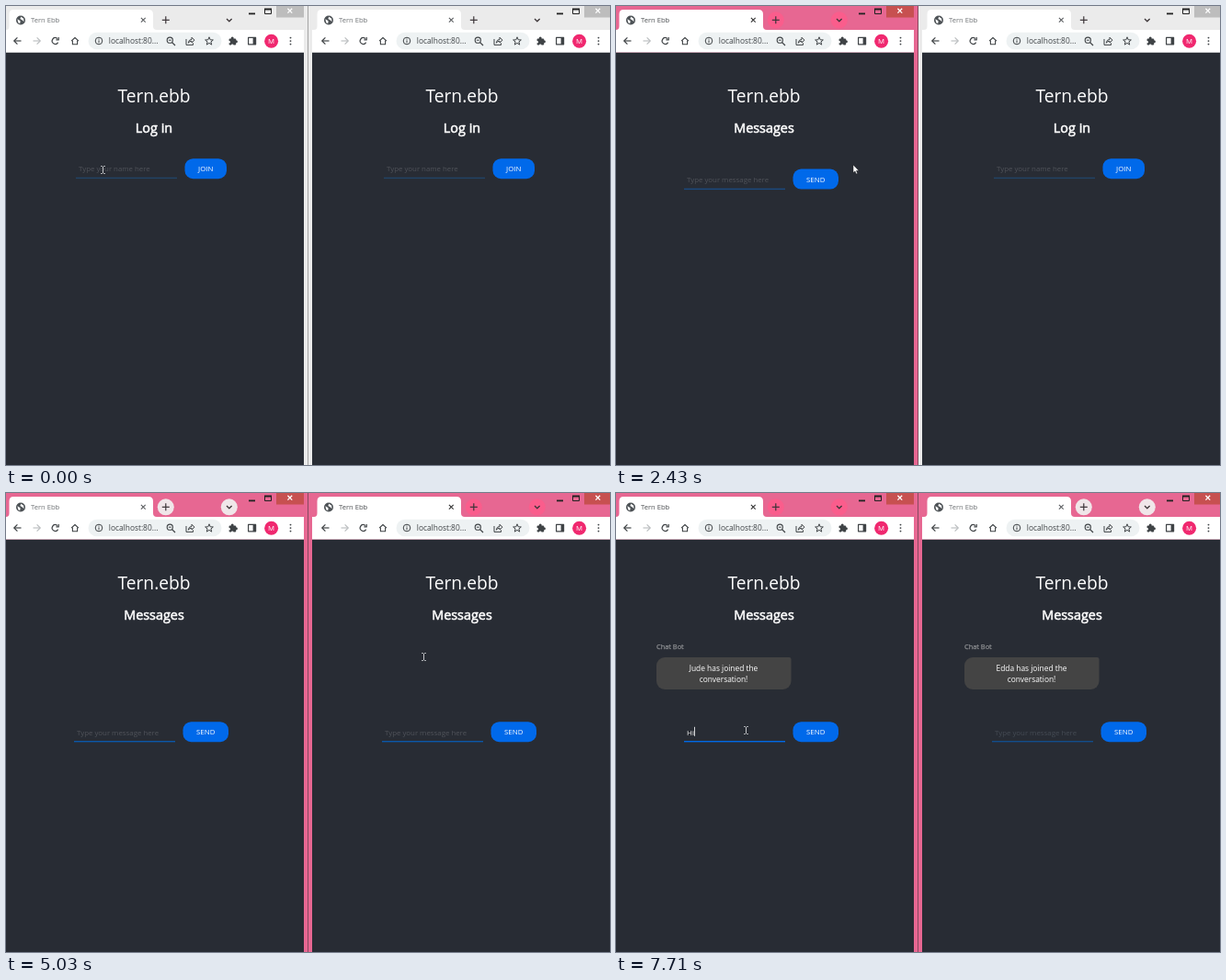
Recreate the animation shown at these times as an HTML page with a canvas. Size 657 by 500 pixels, loop 8 s.

```html
<!DOCTYPE html>
<html lang="en">
<head>
<meta charset="utf-8">
<title>Two chat windows</title>
<style>
  html, body { margin: 0; width: 100%; height: 100%; overflow: hidden; background: #282c34; }
  canvas { display: block; width: 657px; height: 500px; }
</style>
</head>
<body>
<canvas id="stage" width="657" height="500"></canvas>
<script>
const ctx = document.getElementById('stage').getContext('2d');
const LOOP = 8000;
const SHIFT = 335;
const SANS = '"Open Sans", "Noto Sans", sans-serif';
const BG = '#282c34', BLUE = '#0069ea', PINK = '#e76792', INK = '#3f4346';

// pointer: time, x, y
const PATH = [
  [0, 105, 178], [40, 105, 178], [420, 106, 174], [1650, 106, 174],
  [1840, 216, 171], [2310, 216, 171], [2430, 258, 173], [2790, 454, 178],
  [6130, 454, 178], [6860, 141, 258], [LOOP, 141, 258]
];

const clamp = v => Math.max(0, Math.min(1, v));
const smooth = v => v * v * (3 - 2 * v);
const ramp = (t, a, b) => smooth(clamp((t - a) / (b - a)));
const within = (t, a, b) => t >= a && t < b;

function mix(a, b, k) {
  const part = (s, i) => parseInt(s.substr(1 + i * 2, 2), 16);
  const c = [0, 1, 2].map(i => Math.round(part(a, i) + (part(b, i) - part(a, i)) * k));
  return `rgb(${c})`;
}

function text(s, x, y, size, color, align = 'left', bold = 0) {
  ctx.font = `400 ${size}px ${SANS}`;
  ctx.textAlign = align;
  ctx.fillStyle = color;
  ctx.fillText(s, x, y);
  if (bold) {
    ctx.strokeStyle = color;
    ctx.lineWidth = bold;
    ctx.strokeText(s, x, y);
  }
}

function rect(x, y, w, h, color) {
  ctx.fillStyle = color;
  ctx.fillRect(x, y, w, h);
}

function round(x, y, w, h, r, color) {
  ctx.fillStyle = color;
  ctx.beginPath();
  ctx.roundRect(x, y, w, h, r);
  ctx.fill();
}

function disc(x, y, r, color) {
  ctx.fillStyle = color;
  ctx.beginPath();
  ctx.arc(x, y, r, 0, 7);
  ctx.fill();
}

function ring(x, y, r, color, w = 1.1, a = 0, b = Math.PI * 2) {
  ctx.strokeStyle = color;
  ctx.lineWidth = w;
  ctx.beginPath();
  ctx.arc(x, y, r, a, b);
  ctx.stroke();
}

function line(color, w, ...pts) {
  ctx.strokeStyle = color;
  ctx.lineWidth = w;
  ctx.beginPath();
  for (let i = 0; i < pts.length; i += 2) ctx.lineTo(pts[i], pts[i + 1]);
  ctx.stroke();
}

function cross(x, y, r, color, w) {
  line(color, w, x - r, y - r, x + r, y + r);
  line(color, w, x + r, y - r, x - r, y + r);
}

function globe(x, y) {
  disc(x, y, 5, '#4d5256');
  ctx.fillStyle = '#fff';
  ctx.beginPath();
  ctx.moveTo(x - 3.6, y - 1.2);
  ctx.lineTo(x - .4, y + .8);
  ctx.lineTo(x - .8, y + 3.8);
  ctx.lineTo(x - 2.8, y + 2.4);
  ctx.fill();
  ctx.beginPath();
  ctx.moveTo(x + .2, y - 3.8);
  ctx.lineTo(x + 3, y - 2);
  ctx.lineTo(x + 3.6, y + 1.4);
  ctx.lineTo(x + 1.8, y);
  ctx.lineTo(x - .6, y - 1.6);
  ctx.fill();
}

function titleBar(bar, circle, dim, close) {
  rect(-6, 0, 334, 26, bar);
  ctx.fillStyle = '#fff';
  ctx.beginPath();
  ctx.moveTo(0, 26);
  ctx.quadraticCurveTo(3.5, 26, 3.5, 22);
  ctx.lineTo(3.5, 9);
  ctx.quadraticCurveTo(3.5, 4, 8, 4);
  ctx.lineTo(155, 4);
  ctx.quadraticCurveTo(160, 4, 160, 9);
  ctx.lineTo(160, 22);
  ctx.quadraticCurveTo(160, 26, 164, 26);
  ctx.fill();
  globe(16, 15.5);
  text('Tern Ebb', 27, 18.3, 7.6, dim ? '#6c7073' : '#4a4d50');
  cross(149.3, 15.2, 2.4, dim ? '#5b5e61' : '#333', 1.1);
  if (circle) [173.8, 242.8].forEach(x => disc(x, 15.3, 9, circle));
  line('#3b3437', 1.2, 169.8, 15.3, 177.8, 15.3);
  line('#3b3437', 1.2, 173.8, 11.3, 173.8, 19.3);
  line('#3b3437', 1.3, 240, 14, 242.8, 16.8, 245.6, 14);
  rect(264, 7.5, 7, 1.8, '#222');
  ctx.strokeStyle = '#222';
  ctx.lineWidth = 1;
  ctx.strokeRect(281.5, 3.5, 7, 5);
  rect(281, 2.5, 8, 2, '#222');
  rect(294, 0, 30, 12.5, close);
  cross(308.8, 5.2, 2.4, '#fff', 1.3);
}

function toolBar() {
  rect(-2, 26, 326, 24.5, '#fff');
  line(INK, 1.2, 16.5, 38, 8.8, 38);
  line(INK, 1.2, 12.4, 34.4, 8.8, 38, 12.4, 41.6);
  line('#bcbfc1', 1.2, 29.5, 38, 37.2, 38);
  line('#bcbfc1', 1.2, 33.6, 34.4, 37.2, 38, 33.6, 41.6);
  ring(53.6, 38, 3.4, INK, 1.2, .5, 5.5);
  line(INK, 1.2, 57.2, 34, 57.2, 36.9, 54.4, 36.9);
  line(INK, 1.1, 71, 38.2, 75, 34.5, 79, 38.2);
  line(INK, 1.1, 72.4, 37.5, 72.4, 41.7, 77.6, 41.7, 77.6, 37.5);

  round(89.5, 28.8, 145, 18.4, 9.2, '#eef2f3');
  ring(101, 38, 3.8, INK, 1);
  rect(100.5, 37.4, 1, 2.8, INK);
  rect(100.5, 35.6, 1, 1, INK);
  text('localhost:80...', 111.8, 41, 8.4, '#404447');
  ring(178.3, 37.2, 3.1, INK, 1.1);
  line(INK, 1.3, 180.6, 39.6, 184, 43);
  line(INK, 1, 176.8, 37.2, 179.8, 37.2);
  line(INK, 1, 196, 36, 196, 42.4, 203.5, 42.4, 203.5, 40.4);
  ctx.beginPath();
  ctx.moveTo(198.2, 40.2);
  ctx.quadraticCurveTo(198.8, 36.4, 202, 36.4);
  ctx.lineTo(202, 34.2);
  ctx.lineTo(205, 37.2);
  ctx.lineTo(202, 40);
  ctx.lineTo(202, 38.3);
  ctx.quadraticCurveTo(199.8, 38.2, 198.2, 40.2);
  ctx.stroke();
  ctx.beginPath();
  for (let i = 0; i < 10; i++) {
    const r = i % 2 ? 2 : 4.6, a = i * Math.PI / 5 - Math.PI / 2;
    ctx.lineTo(221 + r * Math.cos(a), 38.4 + r * Math.sin(a));
  }
  ctx.closePath();
  ctx.stroke();

  round(242.6, 35.4, 7.6, 7.2, 1, INK);
  disc(246.2, 35, 1.5, INK);
  disc(250.4, 38.8, 1.5, INK);
  disc(242.8, 39.2, 1.2, '#fff');
  disc(246.2, 42.6, 1.2, '#fff');
  ctx.strokeStyle = INK;
  ctx.lineWidth = 1.2;
  ctx.strokeRect(263.6, 34.4, 8, 7.4);
  rect(268.6, 34, 3.4, 8, INK);
  disc(288.6, 38.3, 7.5, '#f0286f');
  text('M', 288.6, 41.1, 7.8, '#fff', 'center');
  [34.6, 38.1, 41.6].forEach(y => disc(309.5, y, .95, INK));
}

function button(label, x, y, w, color = BLUE) {
  round(x, y, w, 22, 9, color);
  text(label, x + w / 2, y + 14, 7.9, '#fff', 'center');
}

// x: left edge, y: underline
function field(x, y, hint, f) {
  rect(x, y - .8, 110, 1.4, f.rule);
  const tx = x + 3, base = y - 7.3;
  if (f.value) text(f.value, tx, base, 8, '#f2f2f2');
  else text(hint, tx, base, 7.85, f.hint);
  if (f.caret) {
    ctx.font = `400 8px ${SANS}`;
    const cx = Math.round(tx + ctx.measureText(f.value).width);
    rect(cx, y - 16, 1, 10, '#d4d6d8');
  }
}

function botNote(who, alpha) {
  ctx.globalAlpha = alpha;
  text('Chat Bot', 44, 170, 7.4, '#8c8e91', 'left', .25);
  round(44, 179, 146.5, 35, [9, 2, 9, 9], '#444444');
  text(`${who} has joined the`, 117, 194, 8.4, '#fff', 'center');
  text('conversation!', 117, 206, 8.4, '#fff', 'center');
  ctx.globalAlpha = 1;
}

function drawWindow(dx, w) {
  ctx.save();
  ctx.translate(dx, 0);
  ctx.beginPath();
  ctx.rect(-6, 0, 334, 500);
  ctx.clip();
  rect(-6, 0, 334, 500, w.bar);
  titleBar(w.bar, w.circle, w.dim, w.close);
  rect(-2, 50.5, 326, 450, BG);
  toolBar();
  text('Tern.ebb', 161, 105, 19.2, '#fff', 'center');
  text(w.chat ? 'Messages' : 'Log in', 161, 138.3, 14.4, '#fff', 'center', .55);
  if (w.chat) {
    if (w.note > 0) botNote(w.who, w.note);
    field(74, w.low ? 270.8 : 199.5, 'Type your message here', w.field);
    button('SEND', 192.5, w.low ? 249.2 : 177.6, 49.5);
  } else {
    field(76, 187.5, 'Type your name here', w.field);
    button('JOIN', 194.5, 166.2, 45.5, w.hover ? '#0062dc' : BLUE);
  }
  ctx.restore();
}

function typed(t, keys) {
  return keys.filter(k => t >= k[0]).map(k => k[1]).join('');
}

function leftState(t) {
  const on = ramp(t, 20, 200), chat = t >= 2030, back = t >= 6940;
  const low = t >= 5030, focus = ramp(t, 6940, 7170);
  const active = within(t, 40, 3300) || back;
  const f = {};
  if (!chat) {
    f.value = typed(t, [[710, 'E'], [1020, 'd'], [1130, 'd'], [1470, 'a']]);
    f.hint = mix('#50535a', '#74777c', on);
    f.rule = mix('#214467', '#2c6394', ramp(t, 40, 420));
    f.caret = within(t, 120, 1380) || within(t, 1470, 1800);
  } else {
    f.value = typed(t, [[7460, 'H'], [7710, 'i']]);
    f.hint = mix('#50535a', '#74777c', focus);
    f.rule = low ? mix('#0b57a8', '#0069e6', focus) : '#1b4a80';
    f.caret = t >= 7000;
  }
  return {
    who: 'Jude', chat, low, field: f,
    note: ramp(t, 5030, 6200),
    hover: within(t, 1780, 2030),
    bar: mix('#ebebeb', PINK, t < 40 ? 0 : on),
    close: mix('#bdbdbd', '#c75050', t < 40 ? 0 : on),
    circle: t < 40 ? null : active ? '#fa5d8c' : '#f0e6e9',
    dim: !active
  };
}

function rightState(t) {
  const lit = t >= 3300, chat = t >= 5030, active = within(t, 3300, 6940);
  const focus = ramp(t, 3200, 3490), away = ramp(t, 6940, 7170);
  return {
    who: 'Edda', chat, low: true,
    note: ramp(t, 5030, 6200),
    field: {
      value: chat ? '' : typed(t, [[3800, 'J'], [4100, 'u'], [4340, 'd'], [4450, 'e']]),
      hint: !chat && lit ? mix('#50535a', '#777a7f', focus) : mix('#50535a', '#454b54', away),
      rule: chat ? mix('#0b57a8', '#134d8a', away) : mix('#214467', '#2c70b0', lit ? focus : 0),
      caret: within(t, 3300, 4740)
    },
    bar: lit ? PINK : '#ebebeb',
    close: lit ? '#c75050' : '#bdbdbd',
    circle: !lit ? null : active ? '#fa5d8c' : '#f0e6e9',
    dim: !active
  };
}

function pointerAt(t) {
  let i = 1;
  while (PATH[i][0] < t) i++;
  const [t0, x0, y0] = PATH[i - 1], [t1, x1, y1] = PATH[i];
  let k = clamp((t - t0) / (t1 - t0));
  if (t0 === 2310) k *= k;
  else if (t0 === 2430) k = 1 - (1 - k) ** 1.6;
  else k = smooth(k);
  return [x0 + (x1 - x0) * k, y0 + (y1 - y0) * k];
}

function beam(x, y) {
  x = Math.round(x);
  y = Math.round(y);
  rect(x, y - 3, 1, 7, '#c4c6c9');
  [y - 4, y + 4].forEach(v => {
    rect(x - 2, v, 2, 1, '#a9acb0');
    rect(x + 1, v, 2, 1, '#a9acb0');
  });
}

function arrow(x, y) {
  ctx.beginPath();
  [[0, 0], [0, 8.6], [2, 6.9], [3.3, 9.9], [4.7, 9.3], [3.5, 6.4], [6.1, 6.2]]
    .forEach(p => ctx.lineTo(x + p[0], y + p[1]));
  ctx.closePath();
  ctx.fillStyle = '#fff';
  ctx.fill();
  ctx.strokeStyle = '#15171b';
  ctx.lineWidth = .5;
  ctx.stroke();
}

function hand(x, y) {
  round(x - .8, y, 2, 7, 1, '#fff');
  round(x - 1, y + 3.6, 7, 6.4, [1, 2, 2, 2], '#fff');
  round(x - 3, y + 5, 3, 2.4, 1, '#fff');
  [1.4, 3.2].forEach(d => line('#333', .5, x + d, y + 4.2, x + d, y + 6.6));
}

function drawPointer(t) {
  const [x, y] = pointerAt(t);
  const overText = t < 1650 || (t < 2030 && x < 186) ||
    within(t, 2310, 6130) && x > 411 || t >= 6800;
  if (overText) beam(x, y);
  else if (within(t, 1780, 2030)) hand(x + 2, y + 1);
  else arrow(x, y);
}

function draw(t) {
  ctx.clearRect(0, 0, 657, 500);
  ctx.lineJoin = 'round';
  drawWindow(0, leftState(t));
  drawWindow(SHIFT, rightState(t));
  rect(328, 0, 1, 500, t < 40 ? '#a5a5a5' : '#87495f');
  drawPointer(t);
}

let start = null;
function tick(now) {
  if (start === null) start = now;
  draw((now - start) % LOOP);
  requestAnimationFrame(tick);
}
requestAnimationFrame(tick);
</script>
</body>
</html>
```
